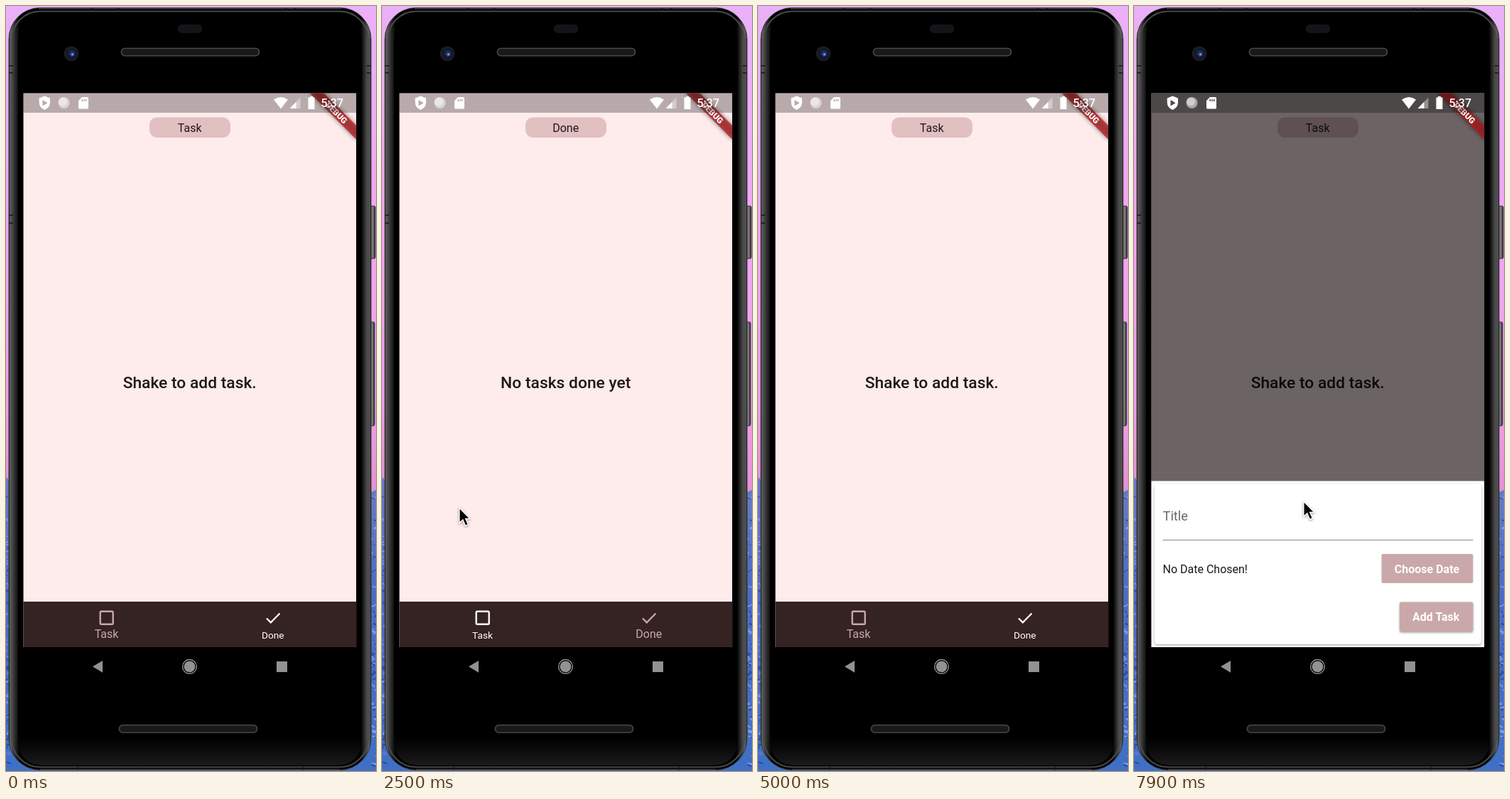
An HTML page that plays this animation: 521 by 1075 pixels, repeating every 8 s.

```html
<!DOCTYPE html>
<html lang="en">
<head>
<meta charset="utf-8">
<title>Task app</title>
<style>
html, body { margin: 0; width: 100%; height: 100%; overflow: hidden; background: #000; }
svg { display: block; width: 521px; height: 1075px; font-family: Roboto, sans-serif; }
.mid { text-anchor: middle; }
.head { font-size: 22.8px; font-weight: 500; fill: #1e1819; }
.body { font-size: 16px; fill: #1e1819; }
.btn { font-size: 16px; font-weight: 700; fill: #fff; }
</style>
</head>
<body>
<svg viewBox="0 0 521 1075">
  <defs>
    <linearGradient id="sky" x2="0" y2="1">
      <stop offset="0" stop-color="#e9b1f8"/>
      <stop offset=".3" stop-color="#f3a6f5"/>
      <stop offset=".52" stop-color="#f09fe8"/>
      <stop offset=".63" stop-color="#e590d6"/>
    </linearGradient>
    <linearGradient id="hills" x2="0" y2="1">
      <stop offset="0" stop-color="#6a7cc4"/>
      <stop offset=".4" stop-color="#4a6cc6"/>
      <stop offset="1" stop-color="#3f70c6"/>
    </linearGradient>
    <linearGradient id="rim">
      <stop offset="0" stop-color="#292929"/>
      <stop offset=".005" stop-color="#666"/>
      <stop offset=".012" stop-color="#3d3d3d"/>
      <stop offset=".022" stop-color="#1a1a1a"/>
      <stop offset=".03" stop-color="#000"/>
      <stop offset=".97" stop-color="#000"/>
      <stop offset=".978" stop-color="#1a1a1a"/>
      <stop offset=".986" stop-color="#3d3d3d"/>
      <stop offset=".994" stop-color="#666"/>
      <stop offset="1" stop-color="#252525"/>
    </linearGradient>
    <linearGradient id="chin" x2="0" y2="1">
      <stop offset="0" stop-color="#000"/>
      <stop offset="1" stop-color="#1c1a1b"/>
    </linearGradient>
    <linearGradient id="key">
      <stop offset="0" stop-color="#333"/>
      <stop offset=".5" stop-color="#858585"/>
      <stop offset="1" stop-color="#2a2a2a"/>
    </linearGradient>
    <clipPath id="screen"><rect x="24.5" y="122.6" width="468.6" height="778.4"/></clipPath>
    <filter id="soft" x="-20%" y="-100%" width="140%" height="300%"><feGaussianBlur stdDeviation="3"/></filter>
    <filter id="lift" x="-10%" y="-20%" width="120%" height="150%">
      <feDropShadow dx="0" dy="1.5" stdDeviation="1.8" flood-opacity=".38"/>
    </filter>
  </defs>

  <rect width="521" height="1075" fill="url(#sky)"/>
  <path d="M0 662L6 668V1075H0ZM512 684L521 680V1075H512ZM0 1010H521V1075H0Z" fill="url(#hills)"/>
  <g id="rocks"></g>

  <g fill="url(#key)" stroke="#222" stroke-width=".8">
    <rect x="512" y="281" width="8" height="74" rx="2"/>
    <rect x="512" y="444" width="7" height="146" rx="2"/>
  </g>
  <rect x="4" y="2.5" width="510" height="1071" rx="44" fill="url(#rim)" stroke="#333"/>
  <rect x="8" y="7.5" width="502" height="1062" rx="40" fill="none" stroke="#484848" stroke-width="2"/>
  <path d="M46 3.5H472M48 1073H470" stroke="#4a4a4a" stroke-width="1.6"/>
  <path d="M4 84H10M4 94H10M508 84H514M508 94H514M4 294H10M4 305H10M121 2V7M158 2V7M394 2V7M408 2V7M101 1069V1074M418 1069V1074" stroke="#171717" stroke-width="1.4"/>
  <rect x="17" y="12" width="484" height="1056" rx="36"/>
  <path d="M17 1028H501Q501 1067 465 1067H53Q17 1067 17 1028Z" fill="url(#chin)"/>

  <rect x="242" y="26" width="34" height="12" rx="5" fill="#151318"/>
  <g fill="#1a1819" stroke="#4b474a" stroke-width="1.6">
    <rect x="162.5" y="59.5" width="194" height="10.5" rx="5"/>
    <rect x="159.5" y="1010.5" width="194" height="10.5" rx="5"/>
  </g>
  <circle cx="92" cy="67" r="10.5" fill="#1b1c21"/>
  <circle cx="92.5" cy="67" r="7" fill="#10172f"/>
  <circle cx="93" cy="67" r="4.5" fill="#1c2d62"/>
  <circle cx="93.5" cy="68" r="1.8" fill="#7898e0"/>

  <g clip-path="url(#screen)">
    <rect x="24" y="122" width="470" height="779" fill="#feebec"/>
    <g id="pages"></g>
    <rect x="24" y="837" width="470" height="64" fill="#352223"/>
    <g id="taskTab">
      <rect x="132.7" y="850.7" width="18" height="18" rx="1.5" fill="none" stroke="currentColor" stroke-width="2.4"/>
      <text class="mid" x="141.5" fill="currentColor">Task</text>
    </g>
    <g id="doneTab">
      <path d="M367 860.5L372.8 866.3L385.5 853.5" fill="none" stroke="currentColor" stroke-width="2.3"/>
      <text class="mid" x="375.8" fill="currentColor">Done</text>
    </g>
    <rect id="scrim" x="24" y="122" width="470" height="779"/>

    <g id="sheet">
      <rect x="24" width="470" height="236" fill="#fff"/>
      <rect x="29" y="4.5" width="460" height="224.5" rx="4.5" fill="#fff" filter="url(#lift)"/>
      <text x="40.5" y="55.5" font-size="18.25" fill="#696568">Title</text>
      <path d="M40.5 83H477.5" stroke="#8b868a" stroke-width="1.2"/>
      <text class="body" x="40.5" y="129">No Date Chosen!</text>
      <rect x="348.5" y="102.5" width="129" height="41" rx="2.3" fill="#caa8a9"/>
      <text class="btn mid" x="412.5" y="129">Choose Date</text>
      <rect x="374" y="170" width="103.5" height="41.5" rx="2.3" fill="#caa8a9" filter="url(#lift)"/>
      <text class="btn mid" x="425.2" y="196.5">Add Task</text>
    </g>

    <g transform="translate(493 122.6) rotate(45)">
      <rect x="-46" y="32" width="92" height="13.7" opacity=".5" filter="url(#soft)"/>
      <rect x="-50" y="32" width="100" height="13.7" fill="#b11c20" fill-opacity=".76"/>
      <text class="mid" y="43" font-size="11.6" font-weight="900" fill="#fff">DEBUG</text>
    </g>
    <rect x="24" y="122" width="470" height="28" opacity=".28"/>
  </g>

  <g fill="#fff">
    <path fill-rule="evenodd" d="M54.3 126.5L62 129.5V135.5Q62 142.5 54.3 146Q46.7 142.5 46.7 135.5V129.5ZM51.5 132V140.5L58.5 136.2Z"/>
    <circle cx="81.5" cy="136" r="8" opacity=".5"/>
    <circle cx="80" cy="134.5" r="6" opacity=".45"/>
    <path fill-rule="evenodd" d="M107 128H114.5Q116 128 116 129.5V143Q116 144.5 114.5 144.5H103.5Q102 144.5 102 143V133ZM106.5 131V134H108V131ZM109.3 131V134H110.8V131ZM112 131V134H113.5V131Z"/>
    <path d="M377 131.5Q387 124.5 397 131.5L387 144.5Z"/>
    <path d="M414.5 128.5V144H399.5Z" opacity=".4"/>
    <path d="M408.5 134.7V144H399.5Z"/>
    <path d="M428 127H432V128.5H434.5V145H425.5V128.5H428Z"/>
    <text x="443.5" y="142.3" font-size="16" font-weight="500">5:37</text>
  </g>

  <g fill="#929292">
    <path d="M122 928.3L136 920V936.7Z"/>
    <circle cx="258.5" cy="928.3" r="7.9"/>
    <circle cx="258.5" cy="928.3" r="9.9" fill="none" stroke="#aaa" stroke-width="1.2"/>
    <rect x="381" y="921" width="15" height="15"/>
  </g>

  <path id="cursor" d="M.8 1V22.5L5.8 18L9.5 26.5L13.5 24.8L9.8 16.5H16Z" stroke="#fff" stroke-width="1.5"
    style="filter:drop-shadow(0 1px 1.5px rgba(0,0,0,.4))"/>
</svg>
<script>
const LOOP = 8000, STEP = 100, PAGE = 469;
const $ = id => document.getElementById(id);

// [time, page offset]
const swipe = [
  [1400, 0], [1800, -106], [1900, -230], [2000, -370], [2100, -445], [2200, -469],
  [2700, -469], [2900, -255], [3000, -225], [3100, -211], [3200, -90], [3300, -20], [3400, 0],
  [3500, 0], [3600, -150], [3700, -390], [3800, -469],
  [4600, -469], [4700, -330], [4800, -140], [4900, -45], [5000, -14], [5100, 0]
];
// [time, x, y] for each stretch where the pointer shows
const moves = [
  [[1200, 290, 700], [1400, 266, 692], [1800, 160, 688], [2000, 75, 692], [2500, 108, 704],
   [2700, 115, 706], [2900, 329, 713], [3100, 373, 714], [3400, 410, 780]],
  [[7300, 200, 790], [7600, 226, 725], [7900, 238, 695]]
];

function at(table, t, col = 1) {
  const i = table.findIndex(row => row[0] >= t);
  if (i < 0) return table[table.length - 1][col];
  if (i === 0) return table[0][col];
  const a = table[i - 1], b = table[i];
  return a[col] + (b[col] - a[col]) * (t - a[0]) / (b[0] - a[0]);
}

const mix = (a, b, k) => a.map((v, i) => Math.round(v + (b[i] - v) * k));
const clamp = k => Math.max(0, Math.min(1, k));

function drawTab(tab, on) {
  const label = tab.querySelector("text");
  tab.style.color = `rgb(${mix([255, 255, 255], [203, 168, 170], on)})`;
  label.setAttribute("font-size", 13.7 + 2.3 * on);
  label.setAttribute("y", 889 - on);
}

function buildPages() {
  const list = [["Task", "Shake to add task."], ["Done", "No tasks done yet"]];
  $("pages").innerHTML = list.map(([title, note], i) => `
    <g transform="translate(${i * PAGE})">
      <rect x="202" y="156.5" width="114" height="28.5" rx="11" fill="#e2bfc1"/>
      <text class="body mid" x="258.7" y="177">${title}</text>
      <text class="head mid" x="258.7" y="537">${note}</text>
    </g>`).join("");
}

function buildRocks() {
  let seed = 7, out = "";
  const rnd = () => (seed = seed * 16807 % 2147483647) / 2147483647;
  const tones = ["#31549f", "#8591d6", "#5d78cc", "#7fa0e0", "#2949a0"];
  for (let i = 0; i < 130; i++) {
    const x = i % 2 ? 513 + rnd() * 6 : rnd() * 4 - 2, y = 690 + rnd() * 380;
    out += `<path d="M${x} ${y}l${2 + rnd() * 5} ${rnd() * 8 - 4}" stroke="${tones[i % 5]}" stroke-width="${1 + rnd() * 2}"/>`;
  }
  $("rocks").innerHTML = out;
}

function draw(t) {
  const offset = at(swipe, t);
  const isDone = time => at(swipe, time) < -PAGE / 2 ? 1 : 0;
  const done = (isDone(t) + isDone(t - STEP)) / 2;
  $("pages").setAttribute("transform", `translate(${offset})`);
  drawTab($("taskTab"), 1 - done);
  drawTab($("doneTab"), done);

  const open = clamp((t - 6500) / 253);
  const rise = 1 - (1 - open) ** 2;
  $("sheet").setAttribute("transform", `translate(0 ${901 - 233.5 * rise})`);
  $("scrim").setAttribute("opacity", 0.575 * open ** 0.78);

  const path = moves.find(m => t >= m[0][0] && t <= m[m.length - 1][0]);
  $("cursor").style.display = path ? "" : "none";
  if (path) $("cursor").setAttribute("transform", `translate(${at(path, t)} ${at(path, t, 2)})`);
}

buildPages();
buildRocks();
const start = performance.now();
function tick() {
  const t = (performance.now() - start) % LOOP;
  draw(Math.floor(t / STEP) * STEP);
  requestAnimationFrame(tick);
}
tick();
</script>
</body>
</html>
```
